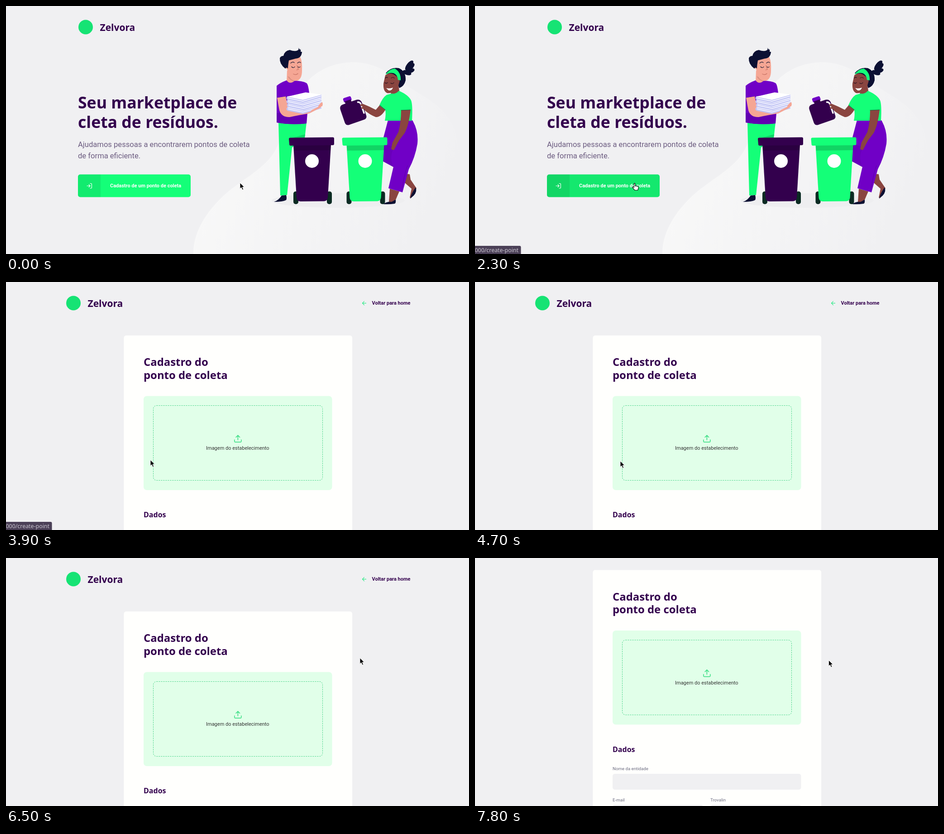
An HTML page that plays this animation: 1023x547 px, repeating every 8 s.

```html
<!DOCTYPE html>
<html lang="pt">
<head>
<meta charset="utf-8">
<title>Ponto de coleta</title>
<style>
html, body { margin: 0; height: 100%; overflow: hidden; background: #f0f0f2 }
svg { display: block; width: 100%; height: 100%; font-family: Roboto, sans-serif }
.head { font-family: "Noto Sans", sans-serif; font-weight: 700; fill: #33004d }
.line { fill: none; stroke-linecap: round; stroke-linejoin: round }
.bold { font-weight: 600; font-size: 11px }
.label { font-size: 9.7px; fill: #6c6c80 }
.green { fill: #14ff78 }
.purple { fill: #7000c6 }
.plum { fill: #33004d }
.navy { fill: #0c1033 }
.skin { fill: #f5a694 }
.brown { fill: #8a4540 }
.wheel { fill: #0b2b23 }
</style>
</head>
<body>
<svg viewBox="0 0 1023 547">
<defs>
  <linearGradient id="fade" gradientUnits="userSpaceOnUse" x1="520" y1="260" x2="930" y2="480">
    <stop stop-color="#f8f8f8"/><stop offset="1" stop-color="#f0f0f2"/>
  </linearGradient>
  <g id="brand">
    <circle cx="17" cy="46.5" r="16" fill="#16e374"/>
    <text class="head" x="48.500" y="55" font-size="21">Zelvora</text>
  </g>
  <g id="bin">
    <rect class="wheel" x="10" y="409" width="11" height="28" rx="5"/>
    <rect class="wheel" x="84" y="409" width="11" height="28" rx="5"/>
    <path d="M10 306H93L86 423Q85 430 78 430.500L26 431Q18 431 17 423Z"/>
    <path d="M10 307H93L92.500 318L11 319Z" fill="#000" fill-opacity=".17"/>
    <path d="M3 290.500L97 289.500Q100 289.500 100 292.500V304Q100 307 97 307L4 308Q1 308 1 305L0 293.500Q0 290.500 3 290.500Z"/>
    <circle cx="51" cy="342" r="15" fill="#fff"/>
  </g>
  <g id="book">
    <path d="M622 199Q617 203 622 207L656 214L697 202V195Z" fill="#c3c6f5"/>
    <path d="M623 202L656 209L698 197V199L656 211L623 204Z" fill="#f4f4ff"/>
    <path d="M621 200L662 190.500L698 195.500L656 207Z" fill="#fff"/>
  </g>
</defs>

<g id="home">
  <path fill="url(#fade)" d="M414 547C412 500 445 445 500 402C540 372 577 352 596 316C612 285 619 262 632 226C650 165 700 124 768 124C815 124 850 149 885 175C930 205 965 218 988 265C1005 305 1000 340 1023 380V547Z"/>
  <ellipse cx="734" cy="429" rx="147" ry="16" fill="#eeeef0"/>
  <use href="#brand" x="159"/>
  <g class="head" font-size="35.600">
    <text x="159" y="226">Seu marketplace de</text>
    <text x="159" y="268.500">cleta de resíduos.</text>
  </g>
  <g font-size="16.600" fill="#6c5c80">
    <text x="159" y="310.500">Ajudamos pessoas a encontrarem pontos de coleta</text>
    <text x="159" y="336">de forma eficiente.</text>
  </g>
  <rect id="button" x="159" y="371.500" width="249" height="50" rx="5"/>
  <path d="M209 371.500H164Q159 371.500 159 376.500V416.500Q159 421.500 164 421.500H209Z" fill-opacity=".08"/>
  <path class="line" transform="translate(177.200 389.800) scale(.58)" stroke="#fff" stroke-width="2" d="M15 3h4a2 2 0 0 1 2 2v14a2 2 0 0 1-2 2h-4M10 17l5-5-5-5M15 12H3"/>
  <text class="bold" x="230" y="400" fill="#fff">Cadastro de um ponto de coleta</text>

  <!-- man -->
  <path class="green" d="M602 257H664L660 292L632 312L621 417L606 418Z"/>
  <path d="M632 291L661 283L660 290Z" fill="#10d568"/>
  <path class="navy" d="M592 432Q602 429 609 418L619 417Q621 424 619 428Q612 432 592 432Z"/>
  <path class="skin" d="M621 142L620 169Q628 174 637 168V158Z"/>
  <path d="M622 155Q628 165 638 167L637 160Z" fill="#d98f82"/>
  <path class="skin" d="M622 120L650 112Q655 122 654 143Q654 161 643 165Q630 166 625 154L621 139Q614 137 617 129Z"/>
  <path class="navy" d="M617 138Q604 128 605 115Q607 110 613 110Q615 99 627 97Q638 101 644 98Q648 96 646 92L650 97L650 94Q652 98 651 101L654 101Q653 115 640 116L625 120Q623 131 623 138Q620 134 617 138Z"/>
  <path class="line" stroke="#1d1d35" stroke-width="1.200" d="M629 126q5-4 8-1M644 126q4-4 7-1M631 134q4 4 7 0M645 134q3 3 5 0"/>
  <path class="line" stroke="#c56f61" stroke-width="1.200" d="M643 131l3 9-4 1M635 150q6 3 10-1"/>
  <path class="purple" d="M598 176Q606 169 620 164Q627 174 638 165Q655 165 664 170Q668 173 670 193L664 259Q630 263 598 257Z"/>
  <path d="M604 236L665 232L664 259Q630 263 598 257V236Z" fill="#6200b0"/>
  <path class="skin" d="M599 203L618 200L623 221L664 233L687 219Q692 212 699 215Q702 221 692 226L670 237Q645 241 627 245Q609 246 604 230Z"/>
  <path class="line" stroke="#f2c06e" stroke-width="1" d="M599 203L618 200"/>
  <use href="#book" y="24"/><use href="#book" x="1" y="16"/><use href="#book" y="8"/><use href="#book"/>
  <path class="skin" d="M671 235L676 229L689 223Q693 214 699 212Q702 219 692 226Z"/>

  <!-- woman -->
  <path class="brown" d="M882 370L892 371L894 383L907 402L896 422L892 423L896 403L880 389Z"/>
  <path class="navy" d="M893 425Q894 416 905 400Q909 409 901 418Z"/>
  <path class="brown" d="M848 403L869 409L859 432L846 433Z"/>
  <path class="navy" d="M833 437Q842 431 852 432L861 427Q862 434 859 436Q846 438 833 437Z"/>
  <path class="purple" d="M844 252H898Q912 276 909 304Q904 334 890 360L876 411L845 402L856 355L832 342L834 290Z"/>
  <path d="M834 305L859 311Q845 330 856 355L832 342Z" fill="#6900bb"/>
  <path class="line" d="M887 352Q879 376 874 408" stroke="#5d00aa"/>
  <g class="navy">
    <ellipse cx="891" cy="131" rx="13" ry="5.500" transform="rotate(-52 891 131)"/>
    <ellipse cx="893" cy="135" rx="12" ry="5.500" transform="rotate(-42 893 135)"/>
    <ellipse cx="893" cy="143" rx="10" ry="5" transform="rotate(-18 893 143)"/>
    <ellipse cx="886" cy="147" rx="10" ry="5" transform="rotate(20 886 147)"/>
    <path d="M839 148Q850 134 868 137Q884 144 883 164Q880 177 869 181L858 158Z"/>
  </g>
  <path class="brown" d="M852 182L867 174L870 193Q861 202 850 196Z"/>
  <path class="brown" d="M838 153Q850 143 865 157L870 165L865 182Q853 194 842 192Q833 188 834 171Z"/>
  <path class="green" d="M838 152Q846 139 859 138Q873 146 872 164L866 163Q865 151 856 148Q847 146 838 152Z"/>
  <path class="line" stroke="#2a1422" stroke-width="1.200" d="M838 159q3-3 5-1M851 159q4-3 7 0M837 169q3 3 6 0M850 170q4 3 7-1"/>
  <path d="M840 181Q848 183 855 180Q852 188 845 186Z" fill="#fff"/>
  <path class="brown" d="M828 216L840 226Q829 246 817 245Q804 240 791 229L782 220Q784 215 789 216L803 222L817 229Z"/>
  <path class="green" d="M852 193Q861 195 868 187Q889 196 895 208Q899 218 897 253H837Q840 239 838 229L825 219Q832 202 841 196Z"/>
  <path class="brown" d="M873 230L894 229Q890 263 881 280L868 297L855 318L851 315L854 301L867 278Q873 256 873 230Z"/>
  <path class="line" stroke="#0b5d38" d="M826 219L838 229M873 230L894 229" stroke-dasharray="2 1"/>

  <!-- jug -->
  <g transform="rotate(-19 766 234)">
    <rect class="purple" x="755" y="198.500" width="18" height="10" rx="3"/>
    <rect class="plum" x="757" y="206" width="14" height="8"/>
    <path class="plum" d="M751 211H780Q791 211 792 220V250Q792 258 784 258H750Q742 258 742 250V221Q742 211 751 211Z"/>
    <path class="line" d="M784 217Q789 218 789 225V244" stroke="#fafafa" stroke-width="3.500"/>
  </g>
  <path class="brown" d="M782 219Q785 214 790 217L801 222L797 231L790 227L783 226L788 222Z"/>

  <use class="plum" href="#bin" x="625"/>
  <use class="green" href="#bin" x="742.500"/>
  <path class="brown" d="M858 298L868 297L857 318L852 315Z"/>
</g>

<g id="form">
  <use href="#brand" x="132"/>
  <path class="line" transform="translate(784.500 39.700) scale(.58)" stroke="#2eea88" stroke-width="2" d="M19 12H5M12 19l-7-7 7-7"/>
  <text class="bold" x="808.500" y="50" fill="#33004d">Voltar para home</text>
  <rect x="260.500" y="118" width="504.500" height="800" rx="5" fill="#fffffd"/>
  <g class="head" font-size="23.900">
    <text x="304" y="185">Cadastro do</text>
    <text x="304" y="213.500">ponto de coleta</text>
    <text x="304" y="519" font-size="16">Dados</text>
  </g>
  <rect x="304" y="251.500" width="416.500" height="207.500" rx="7" fill="#e1ffe9"/>
  <rect class="line" x="325.500" y="272.500" width="374" height="165" rx="7" stroke="#4fd58d" stroke-dasharray="3 2" style="stroke-linecap:butt"/>
  <path class="line" transform="translate(502.400 335.700) scale(.83)" stroke="#45e08a" stroke-width="2" d="M21 15v4a2 2 0 0 1-2 2H5a2 2 0 0 1-2-2v-4M17 8l-5-5-5 5M12 3v12"/>
  <text x="442" y="370" font-size="11" fill="#333">Imagem do estabelecimento</text>
  <g class="label">
    <text x="304" y="559.500">Nome da entidade</text>
    <text x="304" y="628.500">E-mail</text>
    <text x="520" y="628.500">Trovalin</text>
  </g>
  <g fill="#f0f0f2">
    <rect x="304" y="567.500" width="416.500" height="35" rx="5"/>
    <rect x="304" y="636" width="200" height="35" rx="5"/>
    <rect x="520.500" y="636" width="200" height="35" rx="5"/>
  </g>
</g>

<g id="status">
  <rect x="-5" y="529" width="106.500" height="24" rx="3" fill="#4b4057"/>
  <text x="96" y="542.500" text-anchor="end" font-size="12.400" font-family="Noto Sans, sans-serif" fill="#c9c4cf">localhost:3000/create-point</text>
</g>

<g id="cursor" stroke-linejoin="round">
  <path id="arrow" d="M0 0V13L3 10.200L5.300 15.500L7.600 14.500L5.300 9.400H9.500Z" stroke="#fff" stroke-width=".9"/>
  <path id="hand" d="M-1.500 .5Q0-.8 1.200 .8V6Q3 4.800 3.800 6.300Q5.500 5.200 6.200 6.800Q8.200 6 8.200 8V11L6.700 15H0L-5 9Q-5 7-3.500 7.500L-1.500 9Z" fill="#fff" stroke="#000" stroke-width="1.100"/>
  <path id="beam" class="line" d="M-3-6.500Q0-6.500 0-4.500Q0-6.500 3-6.500M0-4.500V4.500M-3 6.500Q0 6.500 0 4.500Q0 6.500 3 6.500" stroke="#111" stroke-width="1.300"/>
</g>
</svg>
<script>
const LOOP = 8000, STEP = 100;
// time, x, y of the pointer
const path = [
  [1000, 517, 390], [1100, 508, 390], [1200, 465, 390], [1300, 407, 390],
  [1500, 399, 389], [1800, 377, 391], [1900, 377, 391], [2800, 319, 391.5],
  [3500, 319, 391.5], [3600, 319, 392.5], [4600, 319, 392.5], [4700, 321, 395],
  [5500, 492, 361], [5600, 502, 357], [6400, 779, 221], [6500, 782, 220.5],
  [6700, 782, 220.5], [6900, 782, 224], [7000, 782, 224], [7100, 781.5, 225.5]
];
const $ = id => document.getElementById(id);
const clamp = v => Math.min(1, Math.max(0, v));
const ramp = (t, from, to) => clamp((t - from) / (to - from));
const show = (id, on) => $(id).style.display = on ? '' : 'none';

function pointer(t) {
  const i = path.findIndex(k => k[0] > t);
  if (i === 0) return path[0].slice(1);
  if (i < 0) return path[path.length - 1].slice(1);
  const a = path[i - 1], b = path[i], p = ramp(t, a[0], b[0]);
  const e = p * p * (3 - 2 * p);
  return [1, 2].map(n => a[n] + (b[n] - a[n]) * e);
}

function draw(now) {
  const t = Math.floor(now % LOOP / STEP) * STEP;
  const onForm = t >= 3900;
  const kind = t >= 1300 && t < 3600 ? 'hand' : t >= 5400 && t < 5700 ? 'beam' : 'arrow';
  const scroll = t < 7400 ? 0 : t < 7500 ? 1.5 : t < 7800 ? 3.5 : 91.5;
  const hover = ramp(t, 1200, 1500);

  show('home', !onForm);
  show('form', onForm);
  for (const id of ['arrow', 'hand', 'beam']) show(id, id === kind);
  $('button').setAttribute('fill', `rgb(20,${255 - 23 * hover},${120 - 10 * hover})`);
  $('form').setAttribute('transform', `translate(0 ${-scroll})`);
  $('cursor').setAttribute('transform', `translate(${pointer(t)})`);
  $('status').setAttribute('opacity', ramp(t, 1900, 2200) * (1 - ramp(t, 3900, 4200)));
  requestAnimationFrame(draw);
}
requestAnimationFrame(draw);
</script>
</body>
</html>
```
